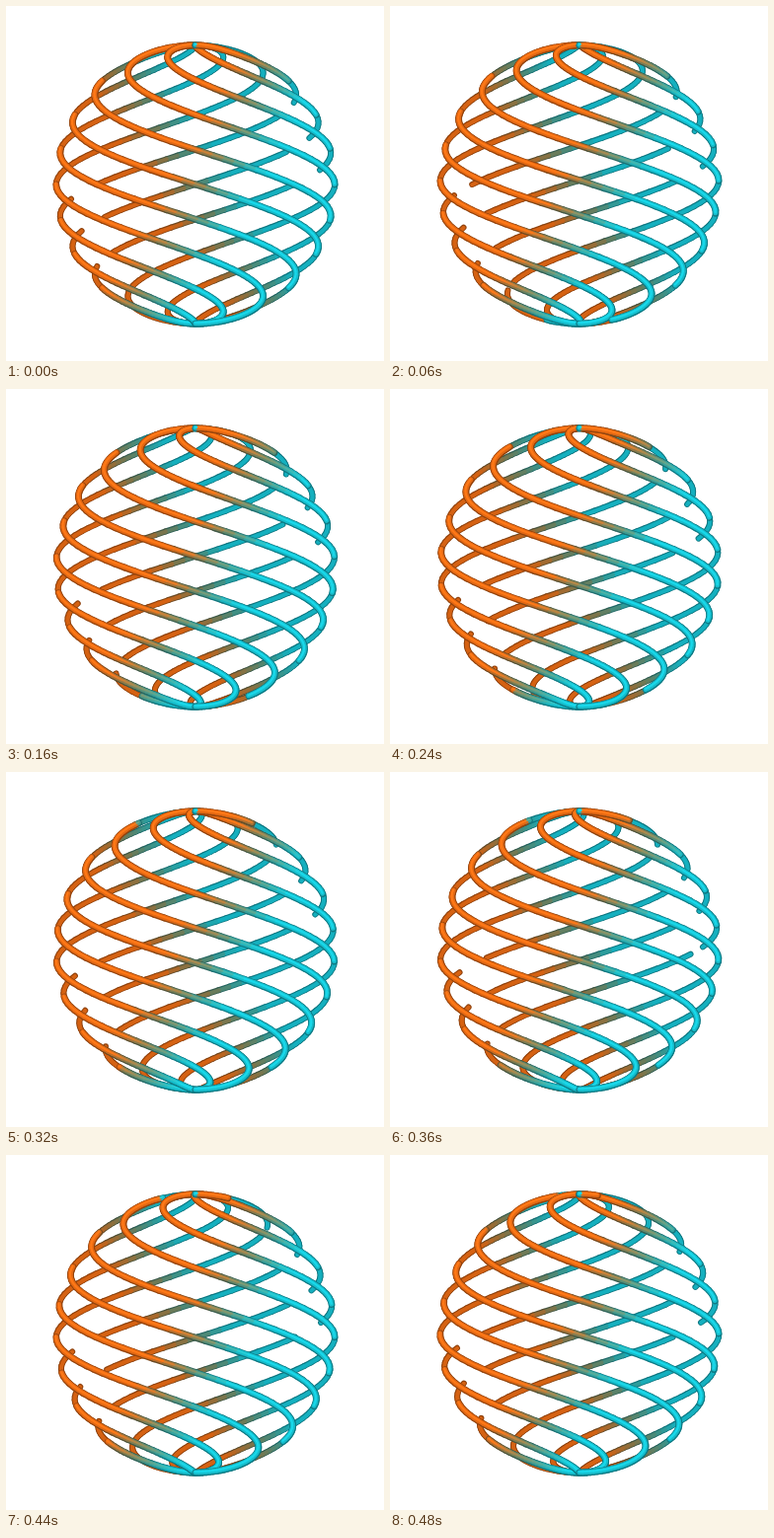
Recreate the animation shown at these times as an HTML page with a canvas. Size 383 by 360 pixels, loop 500 ms.

```html
<!DOCTYPE html>
<html lang="en">
<head>
<meta charset="utf-8">
<title>Spiral sphere</title>
<style>
  html, body { margin: 0; height: 100%; overflow: hidden; background: #fff; }
  canvas { display: block; }
</style>
</head>
<body>
<canvas id="stage" width="383" height="360"></canvas>
<script>
const ctx = document.getElementById('stage').getContext('2d');
const LOOP = 500, FRAME = 20;
const STRANDS = 8, STEPS = 120;
const CX = 192, CY = 181, R = 141.2;
const ORANGE = [248, 114, 22], CYAN = [24, 205, 222];

// Tube layers: width, brightness, offset, shift towards the cool light.
const FRONT = [
  { width: 6.8, light: 0.6, dx: 0, dy: 0, cool: 12 },
  { width: 4.8, light: 0.92, dx: -0.2, dy: -0.4, cool: 0 },
  { width: 2, light: 1.06, dx: -0.4, dy: -0.9, cool: -12 }
];
const BACK = [
  { width: 6, light: 0.58, dx: 0, dy: 0, cool: 12 },
  { width: 4, light: 0.86, dx: 0, dy: 0.2, cool: 0 }
];

const clamp = (v, a, b) => Math.min(b, Math.max(a, v));

// Warm light from the left, cool light from the right.
function shade(p, layer) {
  const side = p.z > 0 ? p.x + 0.55 * p.y - 4 : p.x - 0.6 * p.y;
  const m = clamp(0.5 + (side + layer.cool) / 90, 0, 1);
  const mix = ORANGE.map((v, i) => v + (CYAN[i] - v) * m - 60 * m * (1 - m));
  return `rgb(${mix.map(v => Math.round(clamp(v * layer.light, 0, 255)))})`;
}

// One full turn from pole to pole, at a constant rate in height.
function strand(phase) {
  return Array.from({ length: STEPS + 1 }, (_, i) => {
    const a = Math.PI * i / STEPS;
    const y = -Math.cos(a), r = Math.sin(a);
    const phi = phase + Math.PI * y;
    return { x: R * r * Math.sin(phi), y: R * y, z: r * Math.cos(phi), r };
  });
}

// Short breaks behind the rim, lower left and upper right.
function broken(p) {
  const depth = -p.z / p.r;
  return p.x * p.y < 0 && Math.abs(p.y) < 105 && depth > 0.5 && depth < 0.7;
}

function drawSide(strands, front) {
  for (const pts of strands) {
    for (const layer of front ? FRONT : BACK) {
      ctx.lineWidth = layer.width;
      for (let i = 0; i < STEPS; i++) {
        const a = pts[i], b = pts[i + 1];
        if ((a.z + b.z > 0) !== front || broken(a) || broken(b)) continue;
        ctx.strokeStyle = shade(a, layer);
        ctx.beginPath();
        ctx.moveTo(CX + a.x + layer.dx, CY + a.y + layer.dy);
        ctx.lineTo(CX + b.x + layer.dx, CY + b.y + layer.dy);
        ctx.stroke();
      }
    }
  }
}

function draw(now) {
  const t = Math.floor((now % LOOP) / FRAME) * FRAME / LOOP;
  ctx.fillStyle = '#fff';
  ctx.fillRect(0, 0, 383, 360);
  ctx.lineCap = 'round';
  const strands = Array.from({ length: STRANDS },
    (_, k) => strand((k + t) * 2 * Math.PI / STRANDS));
  drawSide(strands, false);
  drawSide(strands, true);
}

const start = performance.now();
function tick() {
  draw(performance.now() - start);
  requestAnimationFrame(tick);
}
tick();
</script>
</body>
</html>
```
